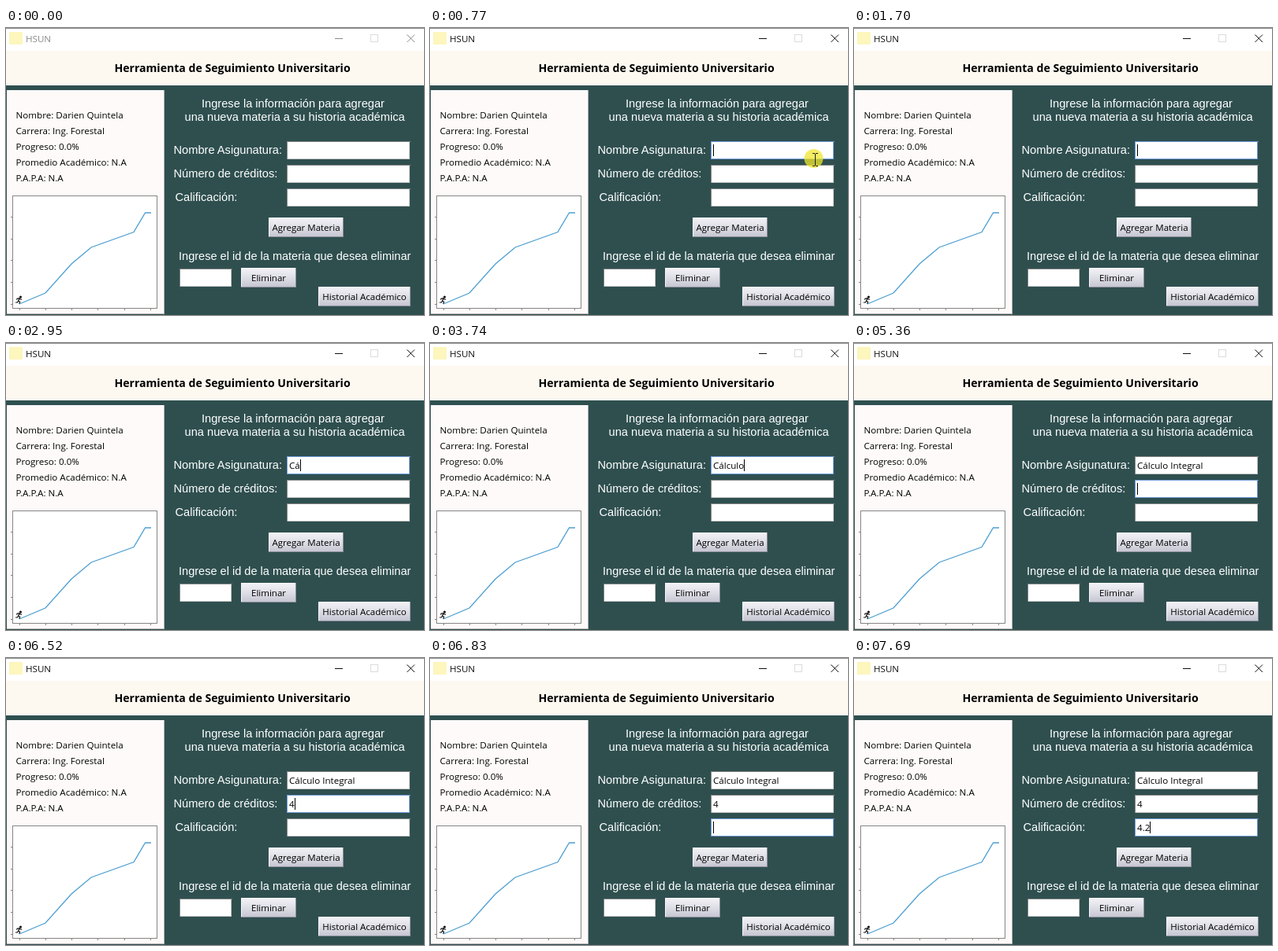
Animation of 530 by 365 pixels, one loop 8000 ms. Source, as an HTML page:

```html
<!DOCTYPE html>
<html lang="es">
<head>
<meta charset="utf-8">
<style>
html, body { margin: 0; width: 100%; height: 100%; overflow: hidden; background: #2f4f4f; }
svg { display: block; }
text { font: 11.6px "Open Sans", "Noto Sans", sans-serif; white-space: pre; }
.big text { font: 14.65px "Liberation Sans", Arial, sans-serif; fill: #fff; }
rect, .crisp { shape-rendering: crispEdges; }
</style>
</head>
<body>
<svg id="stage" width="530" height="365" viewBox="0 0 530 365">
  <defs>
    <linearGradient id="face" x2="0" y2="1">
      <stop offset="0" stop-color="#f2f2f6"/>
      <stop offset=".5" stop-color="#dedee6"/>
      <stop offset="1" stop-color="#c6c6d2"/>
    </linearGradient>
  </defs>
  <rect width="530" height="365" fill="#2f4f4f"/>

  <!-- title bar -->
  <rect width="530" height="29" fill="#fff"/>
  <rect width="530" height="1" fill="#8a8a8a"/>
  <rect x="4" y="5" width="17" height="16" fill="#fdf6bd"/>
  <g id="bar">
    <text x="25" y="18" fill="currentColor">HSUN</text>
    <path class="crisp" d="M417 13.5h10" stroke="currentColor"/>
    <path d="M508.5 8.5l9.500 9.500m0-9.500l-9.500 9.500" stroke="currentColor"/>
  </g>
  <rect x="462.500" y="8.500" width="9" height="9" fill="none" stroke="#dcdcdc"/>

  <rect y="29" width="530" height="44" fill="#fdf8f0"/>
  <text x="287" y="56" text-anchor="middle" style="font-size:14.1px;font-weight:700">Herramienta de Seguimiento Universitario</text>

  <!-- student panel -->
  <rect x="1" y="79" width="200" height="285" fill="#fffafa"/>
  <path class="crisp" d="M1 363.500h199.500V79" fill="none" stroke="#b8b4b4"/>
  <g id="info"></g>
  <rect x="8.500" y="213.500" width="183" height="143" fill="#fff" stroke="#858585"/>
  <path id="ticks" class="crisp" stroke="#858585"/>
  <path d="M17 351L50 337 83 300 108 279 162 259.500 176.500 235H184" fill="none" stroke="#4d9fd2" stroke-width="1.300"/>
  <g fill="none" stroke="#111" stroke-width="1.500" stroke-linecap="round">
    <circle cx="18.500" cy="342" r=".8"/>
    <path d="M17.500 343.500L15.500 347l2.200 1.300-.8 2M15.500 347l-1 2h-2M13.500 345l2-1.300 2 1 2 .5" stroke-width="1.200"/>
  </g>

  <!-- form -->
  <g class="big">
    <text x="248" y="101">Ingrese la información para agregar</text>
    <text x="226.500" y="118">una nueva materia a su historia académica</text>
    <text x="212.500" y="160">Nombre Asigunatura:</text>
    <text x="212.500" y="190">Número de créditos:</text>
    <text x="214.500" y="220">Calificación:</text>
    <text x="219" y="295" style="font-size:14.55px">Ingrese el id de la materia que desea eliminar</text>
  </g>
  <g id="form"></g>

  <rect id="caret" width="1" height="15"/>
  <g id="mouse">
    <circle id="halo" cx="-1.500" cy="-1" r="12" fill="#f0e62e" opacity=".75"/>
    <path class="crisp" d="M-3-7.500h3m1 0h3M.5-7V8M-3 8.500h3m1 0h3" stroke="#222" fill="none"/>
  </g>
</svg>
<script>
const $ = id => document.getElementById(id);

function add(parent, tag, attrs, label) {
  const el = document.createElementNS("http://www.w3.org/2000/svg", tag);
  for (const k in attrs) el.setAttribute(k, attrs[k]);
  if (label) el.textContent = label;
  return parent.appendChild(el);
}

["Nombre: Darien Quintela", "Carrera: Ing. Forestal", "Progreso: 0.0%",
 "Promedio Académico: N.A", "P.A.P.A: N.A"].forEach((s, i) =>
  add($("info"), "text", { x: 12.5, y: 115 + 20 * i }, s));

let ticks = "";
for (let i = 0; i < 5; i++) ticks += `M6 ${240.5 + 27.7 * i}h2`;
for (let i = 0; i < 6; i++) ticks += `M${17 + 33.3 * i} 357v2`;
$("ticks").setAttribute("d", ticks);

function button(x, y, w, label) {
  add($("form"), "rect", { x: x + .5, y: y + .5, width: w - 1, height: 24, fill: "url(#face)", stroke: "#f4f4f8" });
  add($("form"), "path", { d: `M${x} ${y + 24.5}h${w - .5}V${y}`, fill: "none", stroke: "#8e8e9a", class: "crisp" });
  add($("form"), "text", { x: x + w / 2, y: y + 17, "text-anchor": "middle", style: "font-size:11.5px" }, label);
}

// Returns the text and the focus ring of an entry box.
function entry(x, y, w) {
  add($("form"), "rect", { x, y, width: w, height: 23, fill: "#fff" });
  add($("form"), "path", { d: `M${x + .5} ${y + 23}v-22.500h${w}`, fill: "none", stroke: "#858585", class: "crisp" });
  add($("form"), "path", { d: `M${x + 1} ${y + 22.5}h${w - 1.5}v-22`, fill: "none", stroke: "#c4c4c4", class: "crisp" });
  return {
    y,
    ring: add($("form"), "rect", { x: x + .5, y: y + .5, width: w - 1, height: 22, fill: "none", stroke: "#6f9bd8" }),
    text: add($("form"), "text", { x: x + 3, y: y + 16 })
  };
}

const fields = [144, 174, 204].map(y => entry(356, y, 156));
entry(220, 306, 66).ring.remove();
button(333, 241, 95, "Agregar Materia");
button(298, 305, 70, "Eliminar");
button(396, 329, 117, "Historial Académico");

const focusAt = [770, 5360, 6830];
const words = ["Cálculo Integral", "4", "4.2"];
const keys = [
  [2550, 2950, 3100, 3250, 3330, 3570, 3740, 3890, 4200, 4430, 4500, 4600, 4750, 4900, 4980, 5130],
  [6520],
  [7150, 7380, 7610]
];
// The caret flips at each of these times, starting hidden.
const blinks = [770, 1390, 1700, 2250, 2550, 3180, 3500, 4120, 4350, 4980,
  5360, 5990, 6290, 6830, 6830, 7380, 7690];

const passed = (times, t) => times.filter(k => k <= t).length;
const show = (el, on) => el.setAttribute("visibility", on ? "visible" : "hidden");

function draw(t) {
  const focus = passed(focusAt, t) - 1;
  fields.forEach((f, i) => {
    f.text.textContent = words[i].slice(0, passed(keys[i], t));
    show(f.ring, i === focus);
  });

  const caretOn = focus >= 0 && passed(blinks, t) % 2 === 1;
  show($("caret"), caretOn);
  if (caretOn) {
    const f = fields[focus];
    $("caret").setAttribute("x", 359 + Math.round(f.text.getComputedTextLength()));
    $("caret").setAttribute("y", f.y + 4);
  }

  $("bar").setAttribute("color", t < 690 ? "#8a8a8a" : "#111");
  const left = (1 - Math.min(1, Math.max(0, (t - 460) / 230))) ** 2;
  $("mouse").setAttribute("transform",
    `translate(${Math.round(488 + 18 * left)} ${Math.round(167 - 6 * left)})`);
  $("mouse").setAttribute("display", t >= 460 && t < 1010 ? "inline" : "none");
  $("halo").setAttribute("display", t >= 690 && t < 840 ? "inline" : "none");
}

const start = performance.now();
function tick() {
  draw((performance.now() - start) % 8000);
  requestAnimationFrame(tick);
}
tick();
</script>
</body>
</html>
```
